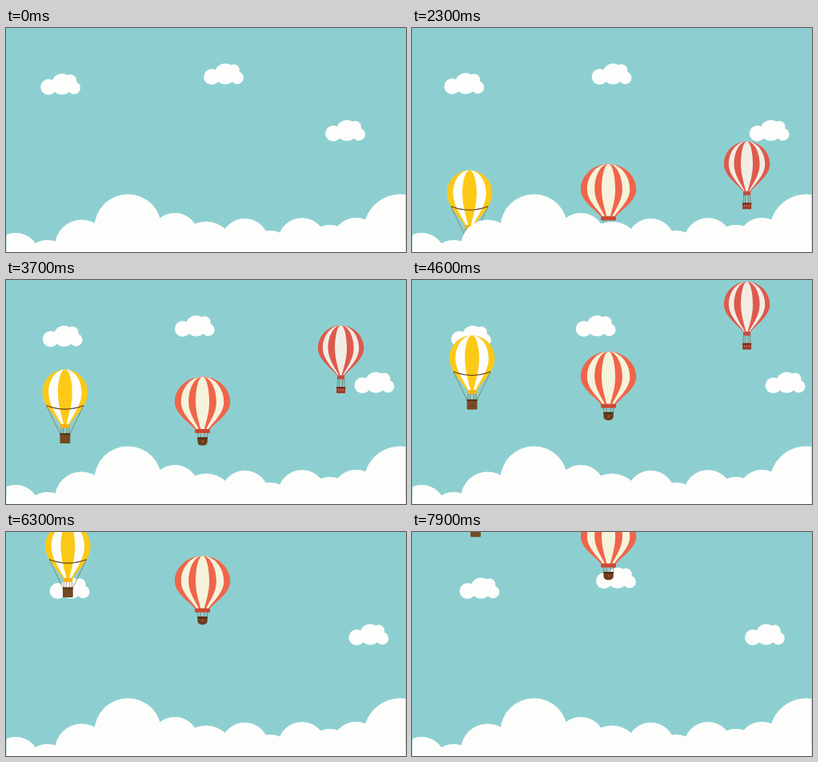
Animation of 500 by 281 pixels, one loop 8 s. Source, as an HTML page with a canvas:

```html
<!DOCTYPE html>
<html lang="en">
<head>
<meta charset="utf-8">
<title>Balloons</title>
<style>
html, body { margin: 0; width: 100%; height: 100%; overflow: hidden; background: #8dcfd0; }
canvas { display: block; width: 500px; height: 281px; }
</style>
</head>
<body>
<canvas id="stage"></canvas>
<script>
const W = 500, H = 281, LOOP = 8000, STEP = 100, REF = 1600;
const SKY = '#8dcfd0', WHITE = '#fdfdfc';
const canvas = document.getElementById('stage');
const ctx = canvas.getContext('2d');
const dpr = window.devicePixelRatio || 1;
canvas.width = Math.round(W * dpr);
canvas.height = Math.round(H * dpr);

function disc(x, y, r) {
  ctx.beginPath();
  ctx.arc(x, y, r, 0, Math.PI * 2);
  ctx.fill();
}

function box(color, x, y, w, h, r = .6) {
  ctx.fillStyle = color;
  ctx.beginPath();
  ctx.roundRect(x, y, w, h, r);
  ctx.fill();
}

// mirrored pair of ropes
function ropes(x1, y1, x2, y2) {
  ctx.strokeStyle = '#6b5a42';
  ctx.lineWidth = .6;
  ctx.beginPath();
  for (const s of [-1, 1]) {
    ctx.moveTo(s * x1, y1);
    ctx.lineTo(s * x2, y2);
  }
  ctx.stroke();
}

// one half of the fabric from crown to neck, squeezed sideways by k
function gore({ w, mid, neck, len }, k) {
  const d = len - mid, hip = neck + (w - neck) * .26;
  ctx.moveTo(0, 0);
  ctx.bezierCurveTo(k * w * .55, 0, k * w, mid * .45, k * w, mid);
  ctx.bezierCurveTo(k * w, mid + d * .42, k * hip, len - d * .24, k * neck, len);
  ctx.lineTo(0, len);
}

function envelope(b) {
  [1, ...b.splits].forEach((k, i) => {
    ctx.fillStyle = b.colors[i % 2];
    ctx.beginPath();
    gore(b, k);
    gore(b, -k);
    ctx.fill('nonzero');
  });
}

function sling(b) {
  const x = b.w * .82, y = b.len * .66;
  ropes(x, y, b.basket.w / 2, b.basket.y);
  ctx.strokeStyle = '#5b3a16';
  ctx.lineWidth = 1.1;
  ctx.beginPath();
  ctx.moveTo(-x, y);
  ctx.quadraticCurveTo(0, y + 9, x, y);
  ctx.stroke();
}

function rig(b) {
  const { y, w, h, round, color, rim, studs } = b.basket;
  if (b.sling) sling(b);
  ropes(b.neck * .8, b.len, w * .42, y + 1);
  ropes(b.neck * .32, b.len, w * .18, y + 1);
  box(b.band, -b.neck, b.len - .3, b.neck * 2, 5);
  box(color, -w / 2, y, w, h, [1, 1, round, round]);
  box(rim, -w / 2 - .2, y - .2, w + .4, 2);
  ctx.fillStyle = '#d9906f';
  for (let i = 0; i < studs; i++) disc((i - (studs - 1) / 2) * 3, y + h * .48, .8);
}

// top is the crown's height at REF
const BALLOONS = [
  { x: 71, drift: .00135, top: 211.5, speed: .0473, w: 28.3, mid: 28.5, neck: 6, len: 68.8,
    colors: ['#fcc916', WHITE], splits: [.73, .315], band: '#f6b316', sling: true,
    basket: { y: 80.4, w: 12.8, h: 12.4, round: 1, color: '#754a22', rim: '#573515', studs: 0 } },
  { x: 245.6, drift: 0, top: 195, speed: .0351, w: 34.7, mid: 32, neck: 9.4, len: 66,
    colors: ['#f0654a', '#f5f3db'], splits: [.77, .5, .245], band: '#cd4731',
    basket: { y: 76.3, w: 12.4, h: 10, round: 5, color: '#6b3d1e', rim: '#4f2b14', studs: 1 } },
  { x: 418.6, drift: 0, top: 185, speed: .0609, w: 28.7, mid: 28.5, neck: 4.6, len: 62.8,
    colors: ['#df594d', '#f1ede4'], splits: [.79, .56, .26], band: '#c94a40',
    basket: { y: 77.1, w: 11, h: 7.9, round: 1.2, color: '#9c3b2b', rim: '#743022', studs: 3 } }
];

function drawBalloon(b, t) {
  ctx.save();
  ctx.translate(b.x + b.drift * (t - REF), b.top - b.speed * (t - REF));
  envelope(b);
  rig(b);
  ctx.restore();
}

// each cloud drifts out to its turning time, then back; lift raises it on the way out
const CLOUDS = [
  { x: 43, y: 57.2, turn: 1400, out: -.0047, back: .0035, ease: .2, lift: .27 },
  { x: 247, y: 44.4, turn: 4450, out: -.0098, back: .00765, ease: 0, lift: 0 },
  { x: 399, y: 115.4, turn: 4450, out: .0098, back: -.00777, ease: 0, lift: 0 }
];

function drawCloud(c, t) {
  const late = Math.max(0, t - c.turn), span = LOOP - c.turn;
  const dx = c.out * Math.min(t, c.turn) + c.back * late * (1 + c.ease * (1 - late / span));
  ctx.save();
  ctx.translate(c.x + dx, c.y + c.lift * Math.min(0, dx));
  ctx.fillStyle = WHITE;
  disc(10.2, 16.8, 10);
  disc(27, 13.2, 13.1);
  disc(37.5, 8.6, 7.6);
  disc(42, 18, 8);
  ctx.restore();
}

// crests of the cloud bank: x, top, and radius where it is not the usual one
const CRESTS = [
  [12, 257], [52, 266], [94.5, 240.5, 33.5], [152.4, 208.5, 42],
  [211, 232], [250, 242.7, 36], [298.5, 239], [330, 254],
  [370, 238.3], [405, 247], [437.5, 238], [493, 208.5, 46]
];

function drawBank() {
  ctx.save();
  ctx.beginPath();
  ctx.rect(.6, 0, W - 1.2, H);
  ctx.clip();
  ctx.fillStyle = WHITE;
  for (const [x, top, r = 30] of CRESTS) disc(x, top + r, r);
  ctx.fillRect(0, 271, W, 10);
  ctx.restore();
}

function draw(t) {
  ctx.setTransform(dpr, 0, 0, dpr, 0, 0);
  ctx.fillStyle = SKY;
  ctx.fillRect(0, 0, W, H);
  for (const c of CLOUDS) drawCloud(c, t);
  for (const b of BALLOONS) drawBalloon(b, t);
  drawBank();
}

const start = performance.now();
function tick() {
  const t = (performance.now() - start) % LOOP;
  draw(Math.floor(t / STEP) * STEP);
  requestAnimationFrame(tick);
}
tick();
</script>
</body>
</html>
```
